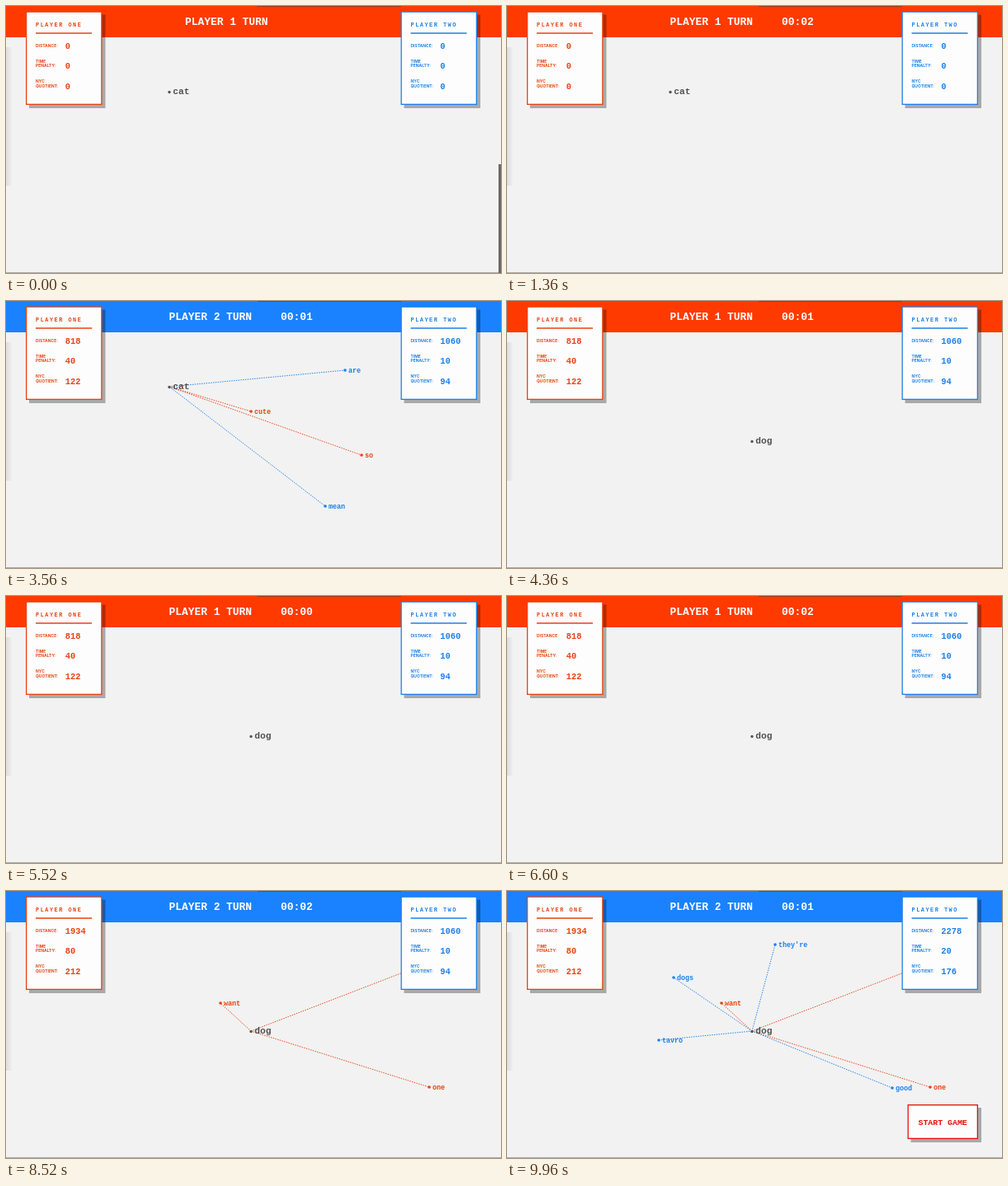
Animation of 600 by 324 pixels, one loop 10000 ms. Source, as an HTML page with a canvas:

```html
<!DOCTYPE html>
<html lang="en">
<head>
<meta charset="utf-8">
<title>Word distance game</title>
<style>
  html, body { margin: 0; width: 600px; height: 324px; overflow: hidden; background: #f2f2f2; }
  canvas { display: block; }
</style>
</head>
<body>
<canvas id="stage" width="600" height="324"></canvas>
<script>
const ctx = document.getElementById('stage').getContext('2d');
const LOOP = 10000;
const MONO = '"Liberation Mono", monospace';
const SANS = 'Inter, sans-serif';
const BANNER = ['#ff3a00', '#1a82ff'];
const INK = ['#e8420f', '#1c80ea'];

const rounds = [
  { word: 'cat', x: 198, y: 104 },
  { word: 'dog', x: 297, y: 170 }
];

// ticks: when the turn's clock reaches 0, 1, 2 seconds; said: when its words land
const turns = [
  { start: 0, player: 0, round: 0, ticks: [300, 700, 1100], said: 1500,
    score: [818, 40, 122], words: [['cute', 297, 134], ['so', 431, 187]] },
  { start: 2240, player: 1, round: 0, ticks: [2700, 3100], said: 3400,
    score: [1060, 10, 94], words: [['are', 411, 84], ['mean', 387, 249]] },
  { start: 4300, player: 0, round: 1, ticks: [5300, 5800, 6300], said: 6900,
    score: [1934, 80, 212], words: [['want', 260, 136], ['one', 513, 238], ['i', 486, 97]] },
  { start: 7800, player: 1, round: 1, ticks: [8600, 9000], said: 9200,
    score: [2278, 20, 176],
    words: [["they're", 325, 65], ['dogs', 202, 105], ['tavro', 184, 181], ['good', 467, 239]] }
];
const START_BUTTON = 9400;

function text(str, x, y, size, color, { font = MONO, spacing = 0 } = {}) {
  ctx.font = `bold ${size}px ${font}`;
  ctx.letterSpacing = spacing + 'px';
  ctx.fillStyle = color;
  ctx.fillText(str, x, y);
}

function dot(x, y, r, color) {
  ctx.fillStyle = color;
  ctx.beginPath();
  ctx.arc(x, y, r, 0, Math.PI * 2);
  ctx.fill();
}

function line(x1, y1, x2, y2, color, width, dash = []) {
  ctx.strokeStyle = color;
  ctx.lineWidth = width;
  ctx.setLineDash(dash);
  ctx.beginPath();
  ctx.moveTo(x1, y1);
  ctx.lineTo(x2, y2);
  ctx.stroke();
  ctx.setLineDash([]);
}

function box(x, y, w, h, color) {
  ctx.fillStyle = 'rgba(0, 0, 0, 0.3)';
  ctx.fillRect(x + 4, y + 4, w, h);
  ctx.fillStyle = color;
  ctx.fillRect(x, y, w, h);
  ctx.fillStyle = '#fdfdfd';
  ctx.fillRect(x + 1.3, y + 1.3, w - 2.6, h - 2.6);
}

function card(x, title, color, score) {
  const label = (str, y) => text(str, x + 12, y, 4.9, color, { font: SANS, spacing: 0.05 });
  box(x, 6.5, 92.5, 113.5, color);
  text(title, x + 12, 24.5, 6.8, color, { spacing: 1.55 });
  line(x + 12, 33, x + 80, 33, color, 1.5);
  label('DISTANCE:', 50);
  label('TIME', 69);
  label('PENALTY:', 74);
  label('NYC', 93.3);
  label('QUOTIENT:', 98.6);
  score.forEach((value, i) => text(value, x + 47.8, 52 + i * 24.4, 10.4, color));
}

function page(t) {
  ctx.fillStyle = '#f2f2f2';
  ctx.fillRect(0, 0, 600, 324);
  const shade = ctx.createLinearGradient(0, 0, 8, 0);
  shade.addColorStop(0, 'rgba(0, 0, 0, 0.09)');
  shade.addColorStop(1, 'rgba(0, 0, 0, 0)');
  ctx.fillStyle = shade;
  ctx.fillRect(0, 50, 8, 168);
  ctx.fillStyle = '#aaa';
  ctx.fillRect(0, 323, 600, 1);
  if (t < 400) {
    ctx.fillStyle = '#686868';
    ctx.fillRect(597, 192, 3, 132);
  }
}

function banner(t, turn, clock) {
  ctx.fillStyle = BANNER[turn.player];
  ctx.fillRect(0, 0, 600, 38);
  ctx.fillStyle = 'rgba(60, 60, 60, 0.5)';
  ctx.fillRect(305, 0, 174, 1);
  text(`PLAYER ${turn.player + 1} TURN`, clock < 0 ? 217 : 197.5, 22.5, 12.9, '#fff');
  if (clock >= 0) text('00:0' + clock, 333, 22.5, 12.9, '#fff');
}

function draw(t) {
  const begun = turns.filter(turn => t >= turn.start);
  const current = begun[begun.length - 1];
  const scores = [[0, 0, 0], [0, 0, 0]];
  let clock = -1; // keeps the previous turn's value until the next tick
  for (const turn of begun) {
    const passed = turn.ticks.filter(tick => t >= tick).length;
    if (passed) clock = passed - 1;
    if (t >= turn.said) scores[turn.player] = turn.score;
  }

  page(t);
  banner(t, current, clock);

  const hub = rounds[current.round];
  const spoken = begun.filter(turn => turn.round === current.round && t >= turn.said);
  for (const { player, words } of spoken) {
    for (const [word, x, y] of words) {
      line(hub.x, hub.y, x, y, INK[player], 1, [1.4, 1.4]);
      dot(x, y, 1.8, INK[player]);
      text(word, x + 4, y + 2.5, 8.4, INK[player]);
    }
  }
  dot(hub.x, hub.y + 0.5, 1.7, '#555');
  text(hub.word, hub.x + 4.3, hub.y + 3.3, 11.2, '#505050');

  card(24, 'PLAYER ONE', INK[0], scores[0]);
  card(478.5, 'PLAYER TWO', INK[1], scores[1]);
  if (t >= START_BUTTON) {
    box(485.5, 259, 85.5, 42, '#e6100c');
    text('START GAME', 498.5, 283.5, 9.9, '#e6100c');
  }
}

function frame() {
  draw(performance.now() % LOOP);
  requestAnimationFrame(frame);
}
frame();
</script>
</body>
</html>
```
